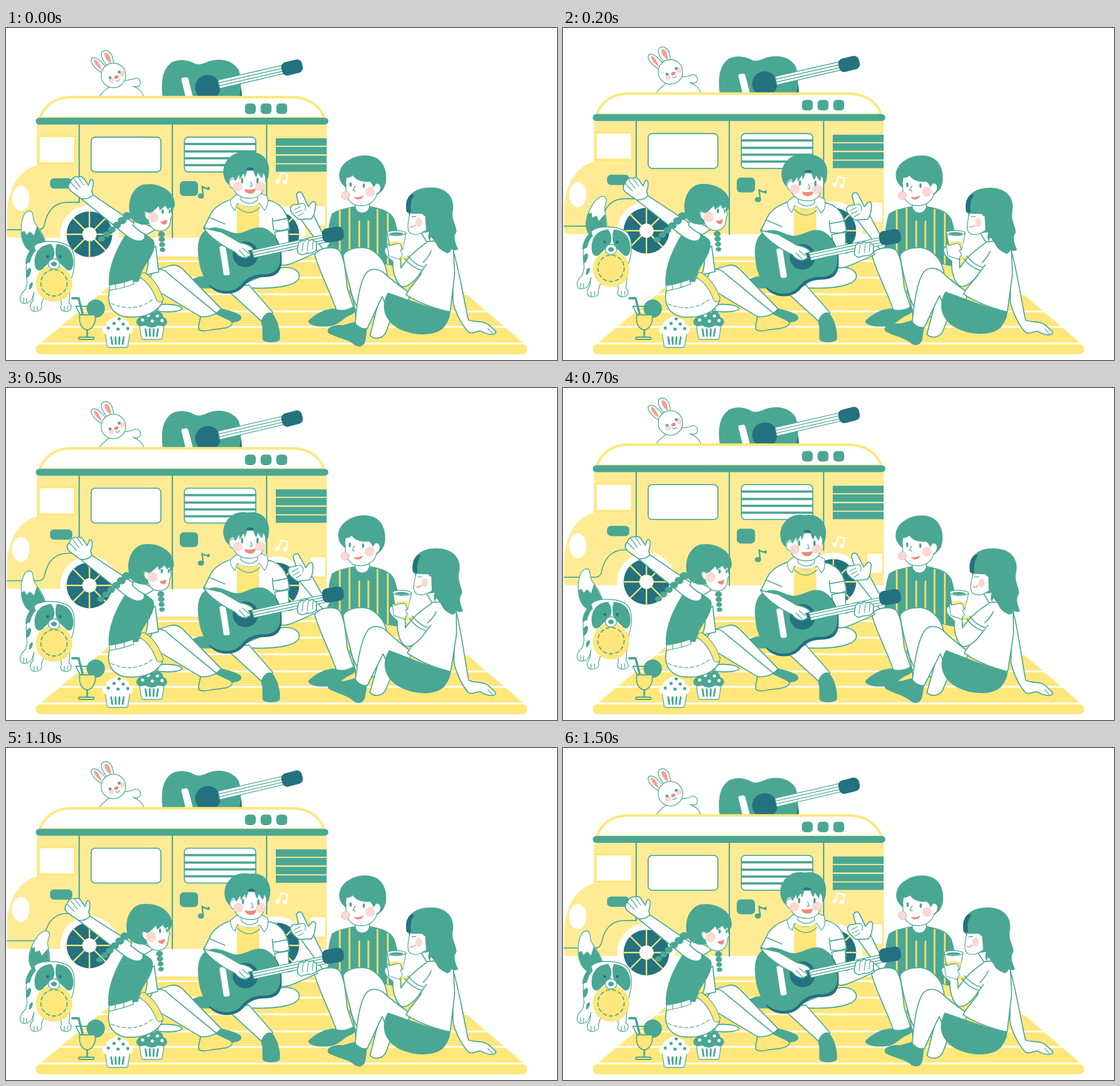
An HTML page that plays this animation: 964x581 px, repeating every 1550 ms.

```html
<!DOCTYPE html>
<html lang="en">
<head>
<meta charset="utf-8">
<title>Picnic by the van</title>
<style>
html, body { margin: 0; width: 100%; height: 100%; overflow: hidden; background: #fff; }
svg { display: block; width: 964px; height: 581px; }
path, rect, ellipse, circle { stroke-linecap: round; stroke-linejoin: round; }
.g { fill: #4aa794; }
.d { fill: #24717f; }
.y { fill: #ffe77b; }
.v { fill: #ffeb94; }
.w { fill: #fff; }
.c { fill: #fbd9d2; }
.m { fill: #f2877a; }
.o { fill: #fff; stroke: #4aa794; stroke-width: 1.8; }
.l { fill: none; stroke: #4aa794; stroke-width: 1.8; }
.yo { fill: #ffe77b; }
.t { stroke-width: 1.3; }
.k { fill: none; stroke: #ffe06a; stroke-width: 3; }
.wl { fill: none; stroke: #fff; stroke-width: 3; }
</style>
</head>
<body>
<svg viewBox="0 0 964 581">
<defs>
  <g id="wheel">
    <circle class="w" r="51"/>
    <circle class="d" r="40"/>
    <path d="M-40 0H40M0-40V40M-28-28 28 28M-28 28 28-28" stroke="#ffe77b" stroke-width="2.5"/>
    <circle class="w" r="12.5"/>
  </g>
  <g id="cake">
    <path class="o t" d="M-22 14H22L18 39Q17 41 14 41H-14Q-17 41-18 39Z"/>
    <path class="l" style="stroke-width:3.2" d="M-11 23-9 35M-3.500 23-3 35M3.500 23 3 35M11 23 9 35"/>
  </g>
  <path id="dome" d="M-24 15C-30 10-26 3-20 1C-20-6-14-9-9-10C-7-16 6-16 9-10C15-9 20-5 20 1C27 3 29 11 24 15C18 20 14 13 8 17C3 20-3 20-8 17C-14 13-18 20-24 15Z"/>
  <g id="dots">
    <circle r="2.8" cx="-16" cy="7"/><circle r="2.8" cx="-6" cy="-1"/><circle r="2.8" cx="1" cy="9"/>
    <circle r="2.8" cx="10" cy="0"/><circle r="2.8" cx="18" cy="8"/><circle r="2.8" cx="3" cy="-9"/>
  </g>
</defs>

<g id="van">
  <g id="bunny">
    <path class="o t" d="M163 120C171 109 179 103 188 100L209 92C216 90 222 91 225 88C232 86 236 92 235 98C233 104 227 103 222 102C233 106 239 112 241 120Z"/>
    <path class="o t" d="M168 78C157 73 148 62 149 55C152 49 161 53 166 59L174 67ZM176 65C168 56 164 45 169 41C177 36 184 44 186 50L189 64Z"/>
    <path d="M168 74C160 69 153 60 154 56C158 53 164 62 168 74ZM184 62C176 58 170 47 173 44C179 41 183 51 184 62Z" fill="#f4a090"/>
    <circle class="o t" cx="188" cy="83" r="21.5"/>
    <circle class="c" cx="184" cy="92" r="5"/><circle class="c" cx="203" cy="80" r="5"/>
    <circle class="g" cx="182" cy="87" r="2.5"/><circle class="g" cx="198" cy="77" r="2.5"/>
    <ellipse class="m" cx="193" cy="86" rx="4" ry="3" transform="rotate(-25 193 86)"/>
    <path class="l t" d="M192 92Q196 95 199 90"/>
  </g>
  <path class="d" d="M340 120 395 70Q411 85 413 120Z"/>
  <path class="g" d="M274 120C271 95 273 72 290 60C304 53 318 56 328 61C338 67 347 61 356 58C378 51 399 59 407 73C411 84 413 105 408 120Z"/>
  <path class="w" d="M307 91Q306 88 309 87L315 86Q318 86 319 89L327 120H314Z"/>
  <circle class="d" cx="353" cy="104" r="22"/>
  <path class="o t" d="M371 91 485 65 489 79 374 106Z"/>
  <path class="l t" d="M372 96 486 70M373 101 487 75"/>
  <rect class="d" x="482" y="57" width="37" height="24" rx="9" transform="rotate(-14 501 69)"/>

  <path class="v" d="M54 166H561V367H8Q2 367 2 360V322C4 278 24 248 54 240Z"/>
  <path d="M59 158C67 136 85 121 115 121H497C530 121 549 136 557 158Z" fill="#fff" stroke="#ffe77b" stroke-width="4.5"/>
  <rect class="g" x="52" y="157" width="512" height="12" rx="6"/>
  <g class="g">
    <rect x="418" y="132" width="19" height="18.5" rx="6"/><rect x="445.5" y="132" width="19" height="18.5" rx="6"/><rect x="473" y="132" width="19" height="18.5" rx="6"/>
    <rect x="472" y="193" width="89" height="13"/><rect x="472" y="208" width="89" height="13"/><rect x="472" y="223.5" width="89" height="13"/><rect x="472" y="238.5" width="89" height="13"/>
  </g>
  <rect x="57" y="189" width="64" height="48" fill="#fff" stroke="#ffe77b" stroke-width="4"/>
  <path class="l" style="stroke-width:2.3" d="M128 169V305M291 169V367M456 169V306"/>
  <rect class="o" x="149" y="191" width="122" height="61" rx="7"/>
  <rect class="o" x="312" y="191" width="125" height="61" rx="7"/>
  <path class="l" style="stroke-width:4" d="M313 203H436M313 216H436M313 228H436M313 240H436"/>
  <ellipse class="w" cx="26" cy="298" rx="15" ry="22"/>
  <rect class="g" x="77" y="263" width="39" height="18" rx="7"/>
  <rect class="g" x="304" y="268" width="32" height="26" rx="7"/>
  <path class="l" d="M2 353H56Q65 353 67 345C72 320 85 305 108 305H128"/>
  <rect x="531" y="310" width="29" height="37" rx="4" fill="#fff" stroke="#ffe77b" stroke-width="3"/>
  <clipPath id="low"><rect x="80" y="300" width="470" height="110"/></clipPath>
  <g clip-path="url(#low)"><use href="#wheel" x="146" y="361"/><use href="#wheel" x="473" y="361"/></g>
</g>

<g id="notes">
  <g class="g"><ellipse cx="341" cy="294" rx="5.5" ry="4.5"/><path class="l" style="stroke-width:2.5" d="M345 293 343 277Q350 283 355 279"/><circle cx="354" cy="281" r="2.5"/></g>
  <g class="w"><circle cx="475" cy="268" r="4"/><circle cx="488" cy="270" r="4"/><path class="wl" style="stroke-width:2.5" d="M478 267 481 254 493 257 490 269"/></g>
</g>

<g id="dog">
  <g id="tail">
    <path class="o t" d="M40 320C30 322 25 340 27 362C29 382 40 393 55 394L70 378C66 362 58 352 50 340C46 333 50 320 40 320Z"/>
    <path class="g" d="M27 358C29 382 40 393 55 394L70 378C66 366 60 357 54 347L49 363 42 356 36 362 32 355Z"/>
  </g>
  <path class="o t" d="M54 378C38 388 32 410 37 445L34 458C24 466 22 476 28 481C40 484 46 478 49 462L47 477C40 485 41 495 50 496C60 496 64 491 62 484L67 468H95L97 484C93 492 98 496 106 496C116 495 116 486 110 481L114 440C121 420 123 396 112 383C98 372 68 371 54 378Z"/>
  <path class="g" d="M50 382C39 390 34 402 34 413L42 410Q46 395 52 390ZM36 424Q43 416 44 424Q43 434 36 438ZM41 449Q47 441 47 449Q44 459 40 457Z"/>
  <path class="l t" d="M31 472V479M36 473V481M49 487V494M55 487V494M102 487V494M108 486V493"/>
  <path class="w" d="M66 385H102V418H66Z"/>
  <path class="g" d="M79 378C61 379 50 391 50 410C50 424 58 428 65 421C70 415 78 410 83 402C87 394 84 385 79 378ZM89 378C107 379 118 391 118 410C118 424 110 428 104 421C98 415 91 410 88 402C86 394 86 385 89 378Z"/>
  <circle class="d" cx="73" cy="400" r="2.5"/><circle class="d" cx="95" cy="400" r="2.5"/>
  <circle class="y" cx="84" cy="447" r="32"/>
  <circle class="l" cx="84" cy="446" r="23" stroke-dasharray="6 5"/>
  <ellipse class="o t" cx="84" cy="413" rx="10" ry="9"/>
  <ellipse class="g" cx="84" cy="413" rx="5" ry="4"/>
</g>

<path class="y" d="M244 400H729L906 552H60Z"/>
<rect class="y" x="52" y="553" width="860" height="18" rx="9"/>
<path class="wl" d="M210 408H760M180 437H790M150 466H830M120 496H860M90 523H885M55 552H910"/>

<g id="drinks">
  <circle class="g" cx="157" cy="491" r="16"/>
  <path class="l" style="stroke-width:4" d="M116 473H127L134 500"/>
  <path class="l" d="M122 487H164L156 502H130Z"/>
  <path class="o yo" d="M129 502H156C158 518 150 528 142 528C134 528 127 518 129 502Z"/>
  <path class="l" style="stroke-width:3" d="M142 529V541"/><rect class="o yo" x="127" y="541" width="27" height="4" rx="2"/>
  <use href="#cake" x="195" y="518"/><use href="#dome" class="w" x="195" y="519"/><use href="#dots" class="g" x="195" y="518"/>
  <use href="#cake" x="255" y="504"/><use href="#dome" class="g" x="255" y="505"/><use href="#dots" class="w" x="255" y="504"/>
</g>

<g id="pal">
  <path class="g" d="M570 325C580 318 596 314 612 312C618 328 632 328 637 312C660 316 674 322 680 335C688 360 690 390 687 418L565 395C562 370 562 350 570 325Z"/>
  <path class="k" d="M584 320V395M601 316V390M618 338V390M634 338V390M650 318V400M668 325V412"/>
  <g id="palArm">
    <path class="o" d="M514 332 543 372 558 392 570 370 553 358 537 325Z"/>
    <path class="o" d="M513 335C501 327 495 318 499 312C502 307 507 310 512 308L508 292C510 286 516 285 519 291L529 312 536 304C543 302 542 310 541 316C540 325 538 330 534 334Z"/>
    <path class="l t" d="M504 318 515 313M506 324 517 319M511 329 520 324M512 308 520 307Q526 311 523 319"/>
  </g>
  <path class="o" d="M590 397C598 384 628 380 642 390C664 405 674 430 662 470L648 505H612C610 470 592 430 590 397Z"/>
  <path class="g" d="M529 512C542 500 558 491 575 491L608 488C618 493 608 501 599 504C588 510 580 521 565 522C545 524 528 520 529 512Z"/>
  <path class="o" d="M540 397C544 386 570 380 583 389C592 402 594 425 597 455L608 488Q594 497 578 493C567 462 550 430 540 397Z"/>
  <path class="l" d="M601 460 614 488"/>
  <g id="palHead">
    <path class="o" d="M611 306V315C616 327 632 327 636 314V300Z"/>
    <path class="g" d="M596 280C574 265 583 240 600 231C616 220 643 220 655 233C667 245 669 272 658 285L645 296 620 270Z"/>
    <path class="w" d="M596 262C591 298 602 311 621 311C637 311 648 300 649 290C657 288 658 271 648 272L643 279C641 273 639 271 636 269C622 270 612 266 607 258Q603 262 596 262Z"/>
    <path class="l t" d="M595 274C593 299 603 311 621 311C637 311 648 300 649 290C657 288 659 270 648 272"/>
    <circle class="c" cx="594" cy="293" r="7"/><circle class="c" cx="637" cy="287" r="8.5"/>
    <circle cx="594" cy="293" r="7" fill="none" stroke="#f4a090" stroke-width=".8"/>
    <ellipse class="g" cx="603" cy="274" rx="2" ry="4"/><ellipse class="g" cx="626" cy="276" rx="2" ry="4"/>
    <path class="l t" d="M611 276 607 284 611 285"/>
    <path class="m" d="M609 296Q618 297 625 293Q624 300 615 300Q610 299 609 296Z"/>
  </g>
</g>

<g id="player">
  <path class="g" d="M323 443C330 434 350 432 366 437L375 455C355 456 332 457 323 450Z"/>
  <path class="o" d="M400 455 480 420C504 416 515 427 513 437C509 449 480 457 430 455Z"/>
  <path class="o" d="M380 452 447 513 467 498 425 450Z"/>
  <path class="g" d="M446 514C448 505 457 494 466 499C475 510 481 530 479 546C473 551 460 551 451 548C445 542 452 530 446 514Z"/>
  <g id="strum">
    <path class="o" d="M398 299C378 304 362 315 357 328L346 350Q356 364 380 370H470L496 353C494 332 488 309 462 302Z"/>
    <path class="y" d="M404 308H443V362H404Z"/>
    <path class="l" d="M357 332 383 343M466 333 468 353Q484 357 496 350M467 338 494 333M346 348Q358 358 376 362"/>
    <path class="o" d="M470 357 478 412C485 420 500 413 545 392L538 372 495 390 494 353Z"/>
    <path class="d" d="M344 380C350 372 370 353 398 362C425 368 435 349 456 353C474 360 485 385 482 413C479 432 468 436 448 436C428 438 422 446 412 456C397 469 370 468 356 452Z"/>
    <path class="g" d="M336 394C334 364 346 349 366 349C384 350 394 361 408 359C424 356 434 346 452 350C472 358 482 384 480 405C478 425 466 432 446 431C426 433 420 440 410 451C395 465 370 462 355 448C343 435 337 415 336 394Z"/>
    <rect class="w" x="377" y="381" width="11" height="52" rx="3" transform="rotate(-9 382 407)"/>
    <circle class="d" cx="419" cy="396" r="22.5"/>
    <path class="o t" d="M430 389 556 362 559 375 434 402Z"/>
    <path class="l t" d="M430 393 557 366M432 398 558 371"/>
    <rect class="d" x="553" y="349" width="38" height="25" rx="9" transform="rotate(-9 572 361)"/>
    <path class="o" d="M346 350C352 362 378 382 401 392C407 401 420 405 423 400C430 400 427 393 424 390L433 388C430 381 418 377 410 376L377 357Z"/>
    <path class="l t" d="M408 389 419 401M413 385 424 394"/>
    <path class="o" d="M512 376Q516 370 522 373Q526 367 531 372Q536 368 539 373Q545 373 543 380V388Q538 395 527 394L517 397Q508 394 510 386Z"/>
    <path class="l t" d="M520 375 518 390M529 374 527 389M537 374 536 387"/>
    <g id="playerHead">
      <path class="o t" d="M402 292 392 301Q394 316 401 319L405 307Q425 319 444 307L452 319Q461 310 457 294L448 290Z"/>
      <path class="y" d="M407 307Q425 319 441 307L443 323H405Z"/>
      <path class="l t" d="M405 314Q425 332 444 314"/>
      <path class="w" d="M411 290V302Q426 314 440 302V288Z"/>
      <path class="l t" d="M411 296V301Q426 313 440 301V296"/>
      <path class="g" d="M392 276C376 265 377 240 390 228C398 218 412 216 423 218C446 213 462 231 460 250C460 262 457 268 450 272Z"/>
      <path class="w" d="M398 261C386 263 388 280 398 281C402 293 412 298 427 298C442 298 449 289 451 278C455 265 454 259 450 254L448 263C445 260 443 257 441 253L438 261C435 258 434 254 433 250H422L418 262 416 254 409 265 408 257 401 268Z"/>
      <path class="l t" d="M398 264C388 262 388 280 398 281C402 293 412 298 427 298C442 298 449 289 451 278"/>
      <path class="d" d="M419 248Q427 240 435 248Z"/>
      <circle class="c" cx="405" cy="278" r="8.5"/><circle class="c" cx="444" cy="277" r="8.5"/>
      <ellipse class="g" cx="413" cy="267" rx="2" ry="5"/><ellipse class="g" cx="440" cy="267" rx="2" ry="5"/>
      <path class="l t" d="M428 269 431 276 427 277"/>
      <path class="m" d="M417 282Q427 284 437 281Q436 290 427 290Q418 289 417 282Z"/>
    </g>
  </g>
</g>

<g id="singer">
  <path class="o" d="M266 484C280 483 300 483 308 490C309 496 290 498 266 496Z"/>
  <path class="g" d="M357 499 372 489C386 494 398 495 409 502C415 508 411 514 398 515C383 516 370 508 357 499Z"/>
  <path class="o" d="M256 425 287 416C297 413 304 416 311 424L376 491Q371 499 360 502L280 440Z"/>
  <path class="o yo" d="M340 505C350 505 362 496 372 502C381 507 390 509 396 515C396 524 383 526 360 528C348 531 338 531 337 526C336 518 340 512 340 505Z"/>
  <path class="o" d="M245 452 256 429C265 419 276 421 284 430L368 499Q355 507 340 505L275 466Z"/>
  <g id="singerTop">
    <path class="o" d="M245 395C252 405 248 420 244 432L267 427 262 382Z"/>
    <path class="o" d="M182 455C176 476 180 498 207 505C237 509 264 500 274 479L241 436Z"/>
    <path class="l t" d="M184 482Q225 500 258 474" stroke-dasharray="6 4"/>
    <path class="l" style="stroke-width:13" d="M241 434Q259 446 269 474"/><path d="M241 434Q259 446 269 474" fill="none" stroke="#ffe77b" stroke-width="10.5"/>
    <path class="g" d="M180 450C178 420 192 388 210 360C225 352 245 358 258 371C264 382 255 400 246 412C238 424 234 434 232 444C214 445 196 448 180 450Z"/>
    <path class="o t" d="M181 450Q204 447 222 440L224 448Q203 456 181 459Z"/><path class="l t" d="M192 449V457M207 446V454"/>
    <path class="o" d="M152 292 224 341C243 350 248 368 238 372C225 376 211 364 198 353L132 299Z"/>
    <path class="o" d="M132 299 113 285C106 278 110 272 113 269C115 262 122 259 127 261C132 258 136 262 138 266L144 275 148 265C155 263 153 277 150 285L152 292Q146 300 132 299Z"/>
    <path class="l t" d="M113 270 125 283M119 264 130 279M127 262 136 275"/>
    <g id="braids" class="g"></g>
    <path class="o" d="M226 334 222 345Q235 358 246 362L262 352Z"/>
    <path class="g" d="M219 333C210 310 218 280 240 274C267 269 298 286 295 312L291 320 270 334 247 344Q229 346 219 333Z"/>
    <path class="w" d="M248 322C239 316 241 334 249 336C251 350 261 356 272 355C284 354 288 344 288 334L291 327 288 319 288 314 283 318 279 311 269 319 267 312 254 324Z"/>
    <path class="l t" d="M251 324C240 315 241 334 249 336C251 350 261 356 272 355C284 354 288 344 288 334L291 327 288 319"/>
    <circle class="c" cx="258" cy="331" r="9"/>
    <ellipse class="g" cx="274" cy="321" rx="2" ry="4"/><ellipse class="g" cx="286" cy="321" rx="1.5" ry="3.5"/>
    <path class="m" d="M270 338Q276 339 282 335Q282 344 277 344Q271 343 270 338Z"/>
  </g>
</g>

<g id="guest">
  <path class="o" d="M637 538 655 465 684 480 664 534C657 545 643 545 637 538Z"/>
  <path class="g" d="M611 514 632 524 629 546C627 556 620 560 610 555C600 545 578 542 564 534C558 524 575 519 590 520Z"/>
  <path class="o" d="M611 517C613 490 618 450 628 432C635 419 652 420 663 430C680 446 695 456 707 464L700 500 672 500 658 470 632 526Q620 528 611 517Z"/>
  <path class="o" d="M782 388C792 420 800 470 809 511C822 516 835 511 845 520L857 531C857 539 842 537 830 530C820 531 814 537 808 531C798 520 787 500 782 480Z"/>
  <path class="l t" d="M843 526 851 534"/>
  <path class="o" d="M735 385 748 374C766 370 782 376 783 392L785 430 777 497C745 490 720 480 700 467C708 450 722 440 726 430Z"/>
  <path class="g" d="M668 463C655 485 660 510 685 525C715 541 752 539 766 524C774 513 777 506 777 497C740 490 705 475 668 463Z"/>
  <g id="guestTop">
    <path class="o" d="M742 371C725 383 712 393 702 405L691 420 690 398C686 391 676 389 667 383C660 383 661 395 668 401L677 409C676 426 682 446 692 452C702 455 716 443 726 427L742 405Z"/>
    <path class="w" d="M736 375 760 370V415L734 413Z"/>
    <path class="l" d="M698 404Q710 419 727 424M703 399Q715 414 730 418M744 390Q740 400 730 410"/>
    <path class="o t" d="M667 359 700 359 694 388H673Z"/>
    <path class="y" d="M671 376Q682 370 697 376L694 386H673Z"/>
    <ellipse class="o t" cx="683" cy="359" rx="16.5" ry="4.5"/><ellipse class="g" cx="683" cy="360" rx="12" ry="2.5"/>
    <path class="o t" d="M668 386Q665 374 671 381L682 378Q690 376 691 381Q695 386 690 390L694 396 689 405 670 399Z"/>
    <path class="o" d="M724 355 736 374 755 372 748 345Z"/>
    <path class="g" d="M701 320C697 292 716 279 743 279C770 279 785 295 782 318C778 336 789 346 788 357C783 364 784 372 791 387Q785 391 780 387Q777 394 772 394C763 390 756 386 753 378Q749 372 744 366Q741 369 742 373Q737 369 740 357L725 359Z"/>
    <path class="w" d="M708 324C703 336 702 350 706 357C711 364 724 363 735 353L733 325Z"/>
    <path class="l t" d="M706 325 704 338C702 350 703 357 709 360Q720 364 731 356"/>
    <path class="d" d="M701 322C697 302 705 288 716 292C709 303 709 314 710 324Z"/>
    <path class="g" d="M709 325Q705 301 717 289L738 300 736 328Q732 331 728 325Z"/>
    <ellipse class="c" cx="722" cy="340" rx="5.5" ry="8"/>
    <path class="l t" d="M710 330H717"/><path d="M707 347Q711 350 716 345" fill="none" stroke="#f2877a" stroke-width="1.5"/>
  </g>
</g>
</svg>
<script>
const LOOP = 1550, STEP = 50;
const el = id => document.getElementById(id);
const put = (id, value) => el(id).setAttribute('transform', value);

// Rises from a to b, stays until c, falls back at d.
const ramp = (t, a, b, c, d) =>
  t <= a || t >= d ? 0 : t < b ? (t - a) / (b - a) : t <= c ? 1 : (d - t) / (d - c);
const peak = (t, a, b, c) => ramp(t, a, b, b, c);
const soft = k => (1 - Math.cos(Math.PI * k)) / 2;

function braid(x, y, dx, dy, n, r) {
  for (let i = 0; i < n; i++) {
    const bead = document.createElementNS('http://www.w3.org/2000/svg', 'ellipse');
    const set = { cx: x + dx * i, cy: y + dy * i, rx: r - i * .4, ry: r * .85 - i * .4 };
    for (const key in set) bead.setAttribute(key, set[key]);
    el('braids').append(bead);
  }
}
braid(212, 329, -9, 8, 6, 8);
braid(272, 361, .6, 9, 4, 6);

function pose(t) {
  const hop = soft(peak(t, 0, 200, 400)) + soft(peak(t, 650, 850, 1050));
  const wag = peak(t, 0, 200, 400) + peak(t, 900, 1100, 1300);
  const sway = peak(t, 0, 300, 600) + peak(t, 800, 1100, 1400);
  const beat = peak(t % 500, 0, 250, 500);
  const point = peak(t, 0, 500, 1000);
  const lean = ramp(t, 0, 500, 700, 1100);

  put('van', `translate(0 ${-25 * peak(t, 0, 800, 1600)})`);
  put('notes', `translate(0 ${14 * peak(t, 0, 450, 900)})`);
  put('dog', `translate(0 ${-25.5 * hop})`);
  put('tail', `rotate(${24 * wag} 55 395)`);
  put('strum', `translate(0 ${5.6 * beat})`);
  put('playerHead', `rotate(${2 * wag} 427 312)`);
  put('palArm', `rotate(${-3.8 * point} 560 380)`);
  put('palHead', `rotate(${-1.8 * point} 622 318)`);
  put('singerTop', `rotate(${-1.6 * sway} 230 480)`);
  put('guest', `rotate(${2 * lean} 790 525)`);
  put('guestTop', `translate(${4 * lean} ${3 * lean})`);
}

function tick(now) {
  pose(Math.floor((now % LOOP) / STEP) * STEP);
  requestAnimationFrame(tick);
}
pose(0);
requestAnimationFrame(tick);
</script>
</body>
</html>
```
